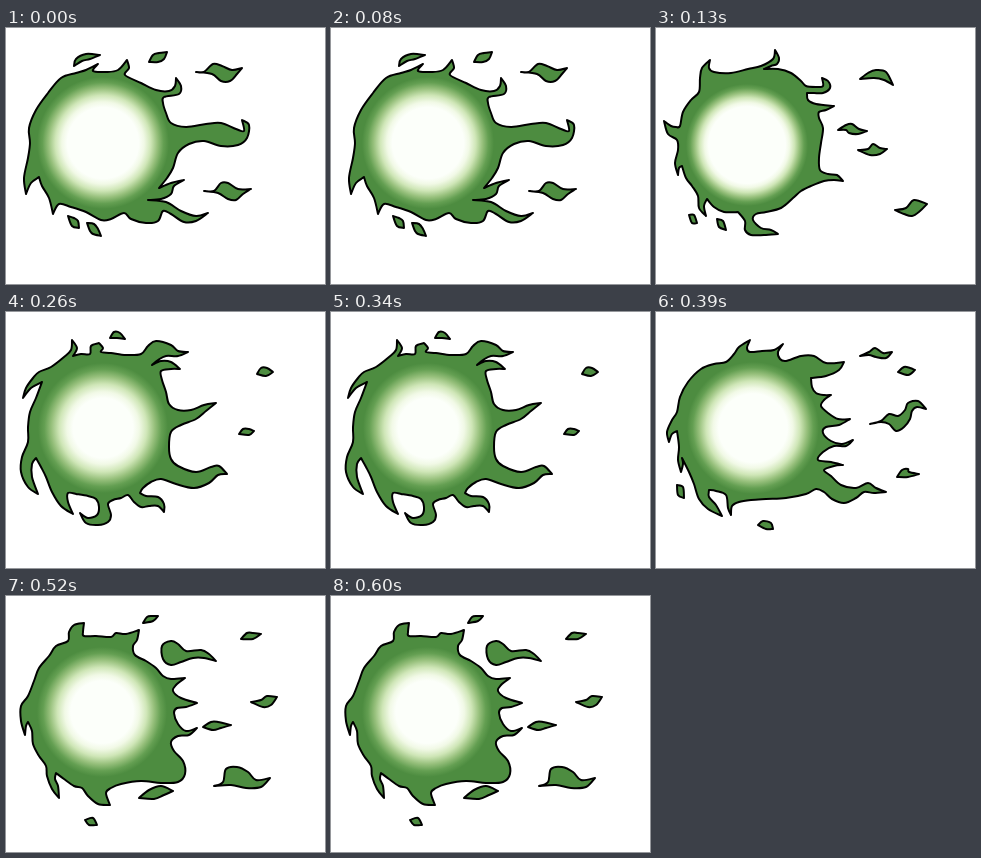
Recreate the animation shown at these times as an HTML page. Size 319 by 256 pixels, loop 650 ms.

```html
<!DOCTYPE html>
<html lang="en">
<head>
<meta charset="utf-8">
<title>Green fireball</title>
<style>
html, body { margin: 0; width: 100%; height: 100%; overflow: hidden; background: #fff; }
svg { display: block; width: 100vw; height: 100vh; }
.pose {
  visibility: hidden;
  animation: show 650ms step-end infinite;
  animation-delay: calc(var(--i) * 130ms - 650ms);
}
.pose path { fill: #4d8c40; stroke: #000; stroke-width: 2; stroke-linejoin: round; }
@keyframes show {
  0% { visibility: visible; }
  20%, 100% { visibility: hidden; }
}
</style>
</head>
<body>
<svg id="stage" viewBox="0 0 319 256"></svg>
<script>
// Outlines are smooth runs of points; "|" follows a sharp tip.
const poses = [
  {
    glow: [97, 115, 66, 0.54],
    body: '20,166 | 18,150 22,130 24,115 23,100 30,82 42,65 55,50 70,45 80,42 92,36 | 87,43 100,44 112,42 121,32 | 123,40 119,47 135,55 150,62 163,63 169,58 170,50 | 175,58 173,66 158,69 157,75 160,85 165,95 180,99 200,96 215,95 230,101 238,103 236,92 | 243,97 241,110 232,117 215,118 198,113 183,116 172,125 167,140 161,150 153,160 | 165,155 178,152 | 168,158 165,166 155,171 142,172 | 160,174 175,183 190,188 202,185 | 190,193 178,194 165,186 157,183 152,193 140,195 125,191 118,185 105,191 95,192 80,184 65,179 53,176 47,186 | 43,170 36,158 33,149 | 25,155 20,166',
    bits: [
      '68,38 | 70,31 80,26 94,27 | 84,31 76,33 68,38',
      '143,34 | 147,27 153,25 161,24 | 158,31 152,34 143,34',
      '190,44 | 198,44 207,36 216,38 226,42 236,40 | 231,46 224,53 215,53 206,46 190,44',
      '198,163 | 208,163 215,155 222,155 232,161 245,161 | 237,166 230,172 222,171 212,165 198,163',
      '62,188 | 68,190 72,193 73,200 | 66,198 62,188',
      '81,195 | 88,196 92,201 95,208 | 87,206 84,203 81,195'
    ]
  },
  {
    glow: [91, 117, 61, 0.63],
    body: '8,93 | 15,98 20,99 24,98 27,84 35,72 43,64 44,50 46,40 54,32 | 53,40 58,44 75,45 92,41 105,38 117,31 119,22 | 123,30 121,36 115,38 108,41 | 122,41 135,45 145,53 150,58 160,59 167,58 166,50 | 172,53 174,60 167,65 158,65 151,65 | 152,72 160,76 178,78 | 170,82 163,84 163,90 167,100 165,115 163,130 164,142 172,146 181,147 187,153 | 178,152 168,153 155,158 145,163 137,170 125,180 110,184 100,186 97,192 105,200 115,202 122,206 | 108,207 95,207 89,202 89,193 82,184 | 68,184 58,179 51,171 | 48,178 50,188 | 43,180 42,168 36,158 30,150 26,138 | 23,140 22,147 | 19,135 22,122 21,112 12,106 8,93',
    bits: [
      '204,51 | 212,45 220,42 230,44 237,57 | 228,52 218,50 204,51',
      '182,102 | 190,97 196,96 203,101 211,103 | 202,106 193,105 190,102 182,102',
      '202,122 | 212,121 217,116 224,120 231,121 | 224,126 214,127 202,122',
      '239,182 | 250,180 258,172 271,176 | 264,183 256,188 248,186 239,182',
      '33,187 | 38,187 41,195 | 36,195 33,187',
      '61,191 | 67,193 70,202 | 63,199 61,191'
    ]
  },
  {
    glow: [97, 116, 65, 0.46],
    body: '17,86 | 20,76 27,66 33,60 45,55 58,45 65,38 66,28 | 71,36 67,44 | 75,42 84,42 85,34 93,31 | 97,36 95,40 105,41 120,43 135,42 142,34 150,29 165,33 172,39 182,40 | 172,44 160,44 152,48 146,53 | 155,49 165,50 174,57 | 165,57 155,59 156,68 160,80 163,92 172,98 185,98 198,93 210,91 | 200,99 190,107 175,113 165,120 163,135 165,147 172,154 190,160 205,155 213,154 221,162 | 212,163 203,171 188,176 170,172 155,167 145,170 137,176 134,181 | 140,184 152,185 158,192 158,200 | 152,194 143,194 135,195 128,190 122,183 115,186 107,188 102,192 105,203 102,210 92,213 80,211 74,201 | 82,206 91,203 93,195 90,187 82,184 70,182 | 62,181 62,190 67,202 | 55,194 46,180 40,165 35,155 30,146 | 26,152 26,165 32,182 | 22,175 15,160 16,145 22,130 22,115 24,100 30,86 36,70 | 25,76 17,86',
    bits: [
      '104,26 | 108,20 114,21 119,27 | 111,26 104,26',
      '251,62 | 255,56 261,56 267,60 | 260,64 251,62',
      '233,122 | 237,117 243,117 248,119 | 243,123 233,122'
    ]
  },
  {
    glow: [97, 116, 66, 0.52],
    body: '94,28 | 91,36 94,40 106,39 118,38 127,32 | 122,40 124,47 130,49 145,44 158,44 170,51 188,50 | 183,58 170,64 155,66 | 156,75 160,81 168,83 175,83 | 168,88 165,94 172,101 182,107 194,107 | 183,113 170,115 167,121 175,129 186,132 197,128 | 190,134 178,134 167,140 162,148 175,150 187,153 | 178,154 168,158 175,164 185,173 200,176 212,171 220,176 230,180 | 218,181 208,180 200,186 188,191 176,187 168,180 160,177 150,182 130,186 110,187 95,188 83,190 76,194 75,203 | 72,196 70,183 60,179 53,178 | 53,185 60,193 66,204 | 52,197 43,187 38,172 33,160 26,146 | 27,152 25,160 | 22,148 23,135 21,119 | 16,122 13,130 | 11,120 16,108 21,100 24,85 32,70 45,57 58,52 70,50 78,42 83,35 94,28',
    bits: [
      '204,44 | 213,40 219,36 227,41 236,40 | 230,46 220,45 213,43 204,44',
      '242,60 | 248,55 254,56 259,58 | 252,63 242,60',
      '214,112 | 225,109 233,102 242,104 249,98 252,91 262,89 270,97 | 261,95 256,99 254,107 248,115 240,119 233,112 225,110 214,112',
      '241,165 | 246,158 252,157 253,160 263,162 | 252,165 241,165',
      '21,173 | 27,175 28,186 | 22,183 21,173',
      '102,213 | 107,209 115,211 117,217 | 110,217 102,213'
    ]
  },
  {
    glow: [96, 116, 65, 0.48],
    body: '78,27 | 77,36 78,40 90,40 105,41 110,37 120,38 133,34 | 131,44 127,50 129,59 140,65 150,72 157,80 165,83 179,82 | 170,89 167,95 175,102 191,107 | 180,111 171,112 168,117 172,128 180,135 191,132 | 183,139 172,140 165,146 168,155 177,165 179,178 172,186 155,187 135,185 115,188 105,192 100,197 104,209 | 92,208 82,200 76,192 68,190 58,183 50,177 | 49,183 52,190 53,202 | 46,193 41,180 40,170 33,160 27,148 26,135 22,126 | 20,130 19,139 | 15,125 15,110 22,100 28,85 33,72 43,60 50,50 62,45 63,36 68,29 78,27',
    bits: [
      '137,27 | 141,21 146,20 152,20 | 147,25 137,27',
      '210,65 | 203,58 195,54 180,55 172,48 165,45 156,50 157,63 165,69 175,66 187,62 198,62 210,65',
      '235,43 | 241,37 247,37 255,38 | 247,43 235,43',
      '245,106 | 255,104 261,100 271,101 | 265,109 257,111 245,106',
      '197,131 | 205,126 212,126 225,129 | 215,132 207,134 197,131',
      '208,190 | 217,186 220,173 231,171 242,176 250,184 264,182 | 255,191 240,192 225,189 208,190',
      '133,202 | 143,194 155,190 167,195 | 158,199 148,203 133,202',
      '79,224 | 87,222 91,229 | 83,229 79,224'
    ]
  }
];

// Catmull-Rom spline through each run, with free ends at the tips.
function outline(text) {
  const runs = text.split('|').map(run =>
    run.trim().split(' ').map(p => p.split(',').map(Number)));
  let tip = runs[0][0];
  let d = 'M' + tip;
  for (const run of runs.slice(1)) {
    const pts = [tip, ...run];
    const at = k => pts[Math.max(0, Math.min(pts.length - 1, k))];
    const bend = (k, s) => at(k).map((v, j) => v + s * (at(k + 1)[j] - at(k - 1)[j]) / 6);
    for (let k = 0; k < pts.length - 1; k++) {
      d += `C${bend(k, 1)} ${bend(k + 1, -1)} ${at(k + 1)}`;
    }
    tip = at(pts.length - 1);
  }
  return d + 'Z';
}

function gradient([x, y, r, core], id) {
  const shades = [[0, '#fcfffa'], [0.18, '#f1f9e6'], [0.4, '#cfe6b7'], [0.62, '#97c07c'], [0.82, '#649f52'], [1, '#4d8c40']];
  const stops = shades.map(([t, c]) =>
    `<stop offset="${core + t * (1 - core)}" stop-color="${c}"/>`).join('');
  return `<radialGradient id="${id}" gradientUnits="userSpaceOnUse" cx="${x}" cy="${y}" r="${r}">${stops}</radialGradient>`;
}

document.getElementById('stage').innerHTML = poses.map(({ glow, body, bits }, i) =>
  `<g class="pose" style="--i:${i}">${gradient(glow, 'glow' + i)}` +
  `<path d="${outline(body)}" style="fill:url(#glow${i})"/>` +
  bits.map(b => `<path d="${outline(b)}"/>`).join('') + '</g>').join('');
</script>
</body>
</html>
```
